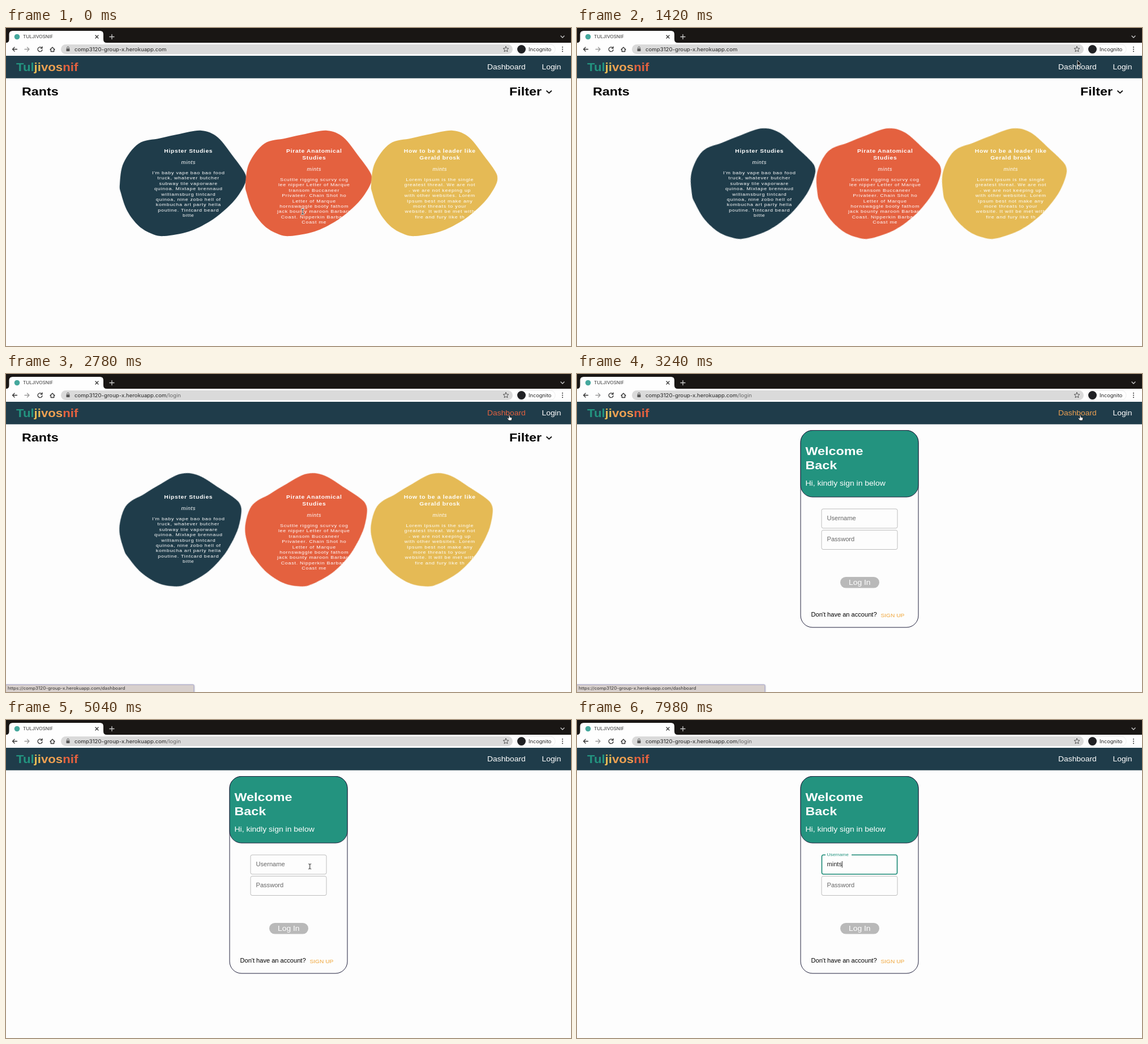
An HTML page for the animation above (8 s loop, 998 by 561 pixels).

```html
<!DOCTYPE html>
<html lang="en">
<head>
<meta charset="utf-8">
<title>Rants</title>
<style>
html, body { margin: 0; height: 100%; overflow: hidden; background: #fdfdfd; }
svg { display: block; width: 100vw; height: 100vh; --wide: 1.11; }

/* The stage has wide pixels, so all text shares one aspect */
text {
  font-family: "Liberation Sans", Arial, sans-serif; white-space: pre;
  transform: scaleX(var(--wide)); transform-box: fill-box; transform-origin: left;
}
.ui { font-family: Inter, Roboto, sans-serif; }
.line { fill: none; stroke: #333; stroke-width: 1.3; stroke-linecap: round; stroke-linejoin: round; }
.thin { stroke: #555; stroke-width: 1; }
.nav { font-size: 12.5px; fill: #fff; }
.head { font-size: 21px; font-weight: bold; }
.card text { fill: #fff; text-anchor: middle; transform-origin: center; font-size: 8px; letter-spacing: .68px; }
.card .title { font-size: 9.3px; font-weight: bold; letter-spacing: .62px; }
.card .author { font-size: 8.5px; font-style: italic; letter-spacing: .54px; }
.box { fill: none; stroke: #bdbdbd; }
.label { font-size: 10px; fill: #666; }

/* One 8 s timeline: 1% is 80 ms */
.anim { animation: 8s linear infinite; }
.cut { animation: 8s step-end infinite; }

.blob { animation-name: turn; }
@keyframes turn { to { transform: rotate(-57.6deg); } }

#rants { animation-name: rants; }
@keyframes rants { 35.25%, to { visibility: hidden; } }
#login { visibility: hidden; animation-name: login; }
@keyframes login { 35.25%, to { visibility: visible; } }
#path { visibility: hidden; animation-name: path; }
@keyframes path { 34.5%, to { visibility: visible; } }
#status { animation-name: status; }
@keyframes status { 0%, 31.7% { opacity: 0; } 32.5%, 60.5% { opacity: 1; } 63%, to { opacity: 0; } }
#link { animation-name: link; }
@keyframes link { 23% { fill: #eda052; } 33.5% { fill: #e4613f; } 35.5% { fill: #eda052; } 43%, to { fill: #fff; } }

#pointer { animation-name: move; }
@keyframes move {
  0%, 2% { transform: translate(524px, 324px); animation-timing-function: ease-in-out; }
  10.3%, 20% { transform: translate(884px, 57px); animation-timing-function: ease-in-out; }
  24%, 28% { transform: translate(882px, 77px); animation-timing-function: ease-in-out; }
  32%, 42% { transform: translate(889px, 72px); animation-timing-function: ease-in-out; }
  51.5%, 52.5% { transform: translate(560px, 251px); animation-timing-function: ease-in-out; }
  70%, to { transform: translate(525px, 262px); }
}
#beam { animation-name: beam; }
@keyframes beam { 5% { visibility: hidden; } 53.5% { visibility: visible; } 86.25%, to { visibility: hidden; } }
#arrow { visibility: hidden; animation-name: arrow; }
@keyframes arrow { 5% { visibility: visible; } 23% { visibility: hidden; } 43% { visibility: visible; } 53.5%, to { visibility: hidden; } }
#hand { visibility: hidden; animation-name: hand; }
@keyframes hand { 23% { visibility: visible; } 43%, to { visibility: hidden; } }

#focus { visibility: hidden; animation-name: focus; }
@keyframes focus { 74.5%, to { visibility: visible; } }
#user { animation-name: float; }
@keyframes float {
  0%, 74.5% { transform: scaleX(var(--wide)); fill: #666; animation-timing-function: ease-out; }
  77%, to { transform: translateY(-17.6px) scale(.75) scaleX(var(--wide)); fill: #23937f; }
}
#caret { animation-name: blink; }
@keyframes blink { from { opacity: 0; } 74.5% { opacity: 1; } 80.75% { opacity: 0; } 86.25%, to { opacity: 1; } }
.type { animation-name: type; }
@keyframes type {
  86.25% { transform: translateX(9.2px); }
  88.25% { transform: translateX(11.7px); }
  90.25% { transform: translateX(17.9px); }
  92.5% { transform: translateX(21px); }
  94.5%, to { transform: translateX(26.6px); }
}
#menu { visibility: hidden; animation-name: menu; }
@keyframes menu { 75.5% { visibility: visible; } 92.5%, to { visibility: hidden; } }
#panel { animation-name: panel; }
@keyframes panel { 86.25%, to { height: 33px; } }
#second { animation-name: second; }
@keyframes second { 86.25%, to { opacity: 0; } }
</style>
</head>
<body>
<svg viewBox="0 0 998 561" preserveAspectRatio="none">
  <defs>
    <clipPath id="typed"><rect class="cut type" x="382" y="240" width="60" height="30"/></clipPath>
    <filter id="soft" x="-10%" y="-20%" width="120%" height="150%"><feDropShadow dx="0" dy="1" stdDeviation="1.5" flood-opacity=".35"/></filter>
    <path id="ibar" d="M-2-4.500Q0-4.500 0-3Q0-4.500 2-4.500M0-3V3M-2 4.500Q0 4.500 0 3Q0 4.500 2 4.500"/>
  </defs>
  <rect width="998" height="561" fill="#fdfdfd"/>

  <g id="browser">
    <rect width="998" height="27" fill="#191614"/>
    <path d="M0 26Q5.500 26 5.500 20V11Q5.500 5 12 5H166Q172 5 172 11V20Q172 26 178 26V28H0Z" fill="#fefefe"/>
    <rect y="26" width="998" height="23" fill="#fefefe"/>
    <circle cx="19.500" cy="15.500" r="4.800" fill="#45a89d"/>
    <text class="ui" x="30" y="18.300" font-size="7.400" fill="#333">TULJIVOSNIF</text>
    <path class="line" d="M158 13l5 5m0-5l-5 5"/>
    <path class="line" style="stroke:#ccc" d="M183 15.500h8m-4-4v8M980 14l3 3 3-3"/>
    <path class="line" d="M19.500 37.500h-8m3.500-3.500l-3.500 3.500 3.500 3.500"/>
    <path class="line" style="stroke:#999" d="M33 37.500h8m-3.500-3.500l3.500 3.500-3.500 3.500"/>
    <path class="line" d="M63.300 35.200A4 4 0 1 0 64 38.500M64 33v2.800h-2.800M78 38l4-4 4 4m-6.700-.8V41.500h5.400V37.200"/>
    <rect x="97" y="29" width="798" height="17" rx="8.500" fill="#dadada"/>
    <rect x="106.500" y="36.300" width="6" height="4.700" rx=".7" fill="#555"/>
    <path class="line thin" d="M107.800 36v-1.300a1.700 1.700 0 0 1 3.400 0V36"/>
    <text class="ui" x="121" y="40.600" font-size="8.700" fill="#222">comp3120-group-x.herokuapp.com<tspan id="path" class="cut" fill="#666">/login</tspan></text>
    <path class="line thin" d="M883 32.500l1.400 3.200 3.500.3-2.700 2.300.8 3.400-3-1.800-3 1.800.8-3.400-2.700-2.300 3.500-.3Z"/>
    <rect x="901" y="29" width="69" height="17" rx="8.500" fill="#fff" stroke="#eee"/>
    <circle cx="910.500" cy="37.500" r="7.500" fill="#202124"/>
    <text class="ui" x="923" y="40.600" font-size="8.300" fill="#222">Incognito</text>
    <path d="M983 33.800v.01m0 3.700v.01m0 3.700v.01" stroke="#333" stroke-width="2" stroke-linecap="round"/>
  </g>

  <g id="navbar">
    <rect y="49" width="998" height="39.700" fill="#1f3c4a"/>
    <text x="18" y="76" font-size="20" font-weight="bold" fill="#23937f">Tul<tspan fill="#e6ba55">ji</tspan><tspan fill="#eda052">vos</tspan><tspan fill="#e4613f">nif</tspan></text>
    <text id="link" class="nav cut" x="850" y="73">Dashboard</text>
    <text class="nav" x="946.500" y="73">Login</text>
  </g>

  <g id="rants" class="cut">
    <text class="head" x="28" y="119">Rants</text>
    <text class="head" x="889" y="119">Filter</text>
    <path d="M954.500 110.500l4.700 4.200 4.700-4.200" fill="none" stroke="#111" stroke-width="1.800"/>
  </g>

  <g id="login" class="cut">
    <g stroke="#20203c">
      <rect x="395" y="99.500" width="208" height="347.500" rx="21" fill="none"/>
      <rect x="395" y="99.500" width="208" height="117.500" rx="21" fill="#23937f"/>
    </g>
    <g fill="#fff">
      <text x="403.500" y="143" font-size="21" font-weight="bold">Welcome<tspan x="403.500" y="168">Back</tspan></text>
      <text x="403.500" y="197" font-size="12.600">Hi, kindly sign in below</text>
    </g>
    <rect class="box" x="432" y="238" width="134" height="34" rx="3"/>
    <rect class="box" x="432" y="275.500" width="134" height="34" rx="3"/>
    <text class="label" x="441.500" y="295">Password</text>
    <rect x="465" y="358" width="69" height="19.500" rx="9.750" fill="#b9b9b9"/>
    <text x="480" y="372" font-size="12.500" fill="#fff">Log In</text>
    <text x="413.500" y="428.500" font-size="10">Don't have an account?</text>
    <text x="536.500" y="429" font-size="9.200" fill="#f0a63a">SIGN UP</text>
    <g id="focus" class="cut">
      <rect x="432.500" y="238" width="133" height="34" rx="3" fill="none" stroke="#23937f" stroke-width="1.600"/>
      <rect x="439" y="236" width="46" height="4" fill="#fdfdfd"/>
      <g clip-path="url(#typed)"><text x="441.500" y="258" font-size="10" fill="#222">mints</text></g>
      <g id="caret" class="cut"><rect class="cut type" x="441.300" y="249" width="1" height="11.500" fill="#222"/></g>
    </g>
    <text id="user" class="label anim" x="441.500" y="258">Username</text>
    <g id="menu" class="cut">
      <rect id="panel" class="cut" x="432" y="273" width="134" height="55" rx="3" fill="#202124" filter="url(#soft)"/>
      <g fill="#eee" font-size="7.700" font-weight="600">
        <text class="ui" x="440" y="292">mints</text>
        <text id="second" class="ui cut" x="440" y="315">velmo</text>
      </g>
    </g>
  </g>

  <g id="status" class="anim">
    <rect x="-1" y="548" width="333" height="14" rx="1.500" fill="#d8d0cd" stroke="#8f8fc0" stroke-width=".8" filter="url(#soft)"/>
    <text class="ui" x="3" y="557.300" font-size="7.300" fill="#333">https://comp3120-group-x.herokuapp.com/dashboard</text>
  </g>

  <g id="pointer" class="anim">
    <g id="beam" class="cut" fill="none" stroke-linecap="round">
      <use href="#ibar" stroke="#fff" stroke-width="2.400"/>
      <use href="#ibar" stroke="#111"/>
    </g>
    <path id="arrow" class="cut" d="M0 0V9.500L2.200 7.500 3.700 10.800 5.300 10.100 3.800 6.900H6.700Z" fill="#000" stroke="#fff" stroke-width=".8"/>
    <path id="hand" class="cut" d="M-1 1Q0-.6 1 1V4L4 4.800Q5 5.200 4.700 6.700L4 10H-.8L-3.600 6.400Q-3.500 5-2.200 5.500L-1 6.500Z" fill="#fff" stroke="#111" stroke-width=".8"/>
  </g>
</svg>

<script>
const rants = document.getElementById('rants');
const LINE = 9.45;

// Outline around its centre, before the wide-pixel aspect
const outline = [[30, -93], [56, -81], [80, -48], [97, -22], [101, -9], [97.5, 5], [84, 28], [65, 49],
  [42, 68], [10, 85], [-29, 93], [-49, 89], [-70, 75], [-88, 49], [-98, 18], [-100, 1],
  [-94, -36], [-70, -70], [-36, -79.5], [-5, -87]];

// Closed Catmull-Rom curve as cubic segments
function smoothPath(points) {
  const at = i => points[(i + points.length) % points.length];
  const handle = (i, sign) => at(i).map((v, k) => (v + sign * (at(i + 1)[k] - at(i - 1)[k]) / 6).toFixed(1));
  const curves = points.map((_, i) => `C${handle(i, 1)} ${handle(i + 1, -1)} ${at(i + 1)}`);
  return `M${points[0]}${curves.join('')}Z`;
}

function add(parent, tag, attrs, text = '') {
  const el = document.createElementNS('http://www.w3.org/2000/svg', tag);
  for (const name in attrs) el.setAttribute(name, attrs[name]);
  el.textContent = text;
  return parent.appendChild(el);
}

function addCard(index, color, title, body) {
  const card = add(rants, 'g', { class: 'card', transform: `translate(${index * 222} 0)` });
  const write = (text, y, kind) => add(card, 'text', { x: 322.3, y, class: kind }, text);
  const frame = add(card, 'g', { transform: 'translate(312 274) scale(1.11 1)' });
  add(frame, 'path', { class: 'blob anim', d: smoothPath(outline), fill: color });
  title.forEach((text, i) => write(text, 220 + i * 12, 'title'));
  const top = 220 + (title.length - 1) * 12;
  write('mints', top + 20, 'author');
  body.forEach((text, i) => write(text, top + 37.8 + i * LINE, 'body'));
}

addCard(0, '#1f3c4a', ['Hipster Studies'], [
  "I'm baby vape bao bao food", 'truck, whatever butcher', 'subway tile vaporware',
  'quinoa. Mixtape brennaud', 'williamsburg tintcard', 'quinoa, nine zobo hell of',
  'kombucha art party hella', 'poutine. Tintcard beard', 'bitte']);
addCard(1, '#e4613f', ['Pirate Anatomical', 'Studies'], [
  'Scuttle rigging scurvy cog', 'lee nipper Letter of Marque', 'transom Buccaneer',
  'Privateer. Chain Shot ho', 'Letter of Marque', 'hornswaggle booty fathom',
  'jack bounty maroon Barbary', 'Coast. Nipperkin Barbary', 'Coast me']);
addCard(2, '#e5ba55', ['How to be a leader like', 'Gerald brosk'], [
  'Lorem Ipsum is the single', 'greatest threat. We are not', '- we are not keeping up',
  'with other websites. Lorem', 'Ipsum best not make any', 'more threats to your',
  'website. It will be met with', 'fire and fury like th']);
</script>
</body>
</html>
```
